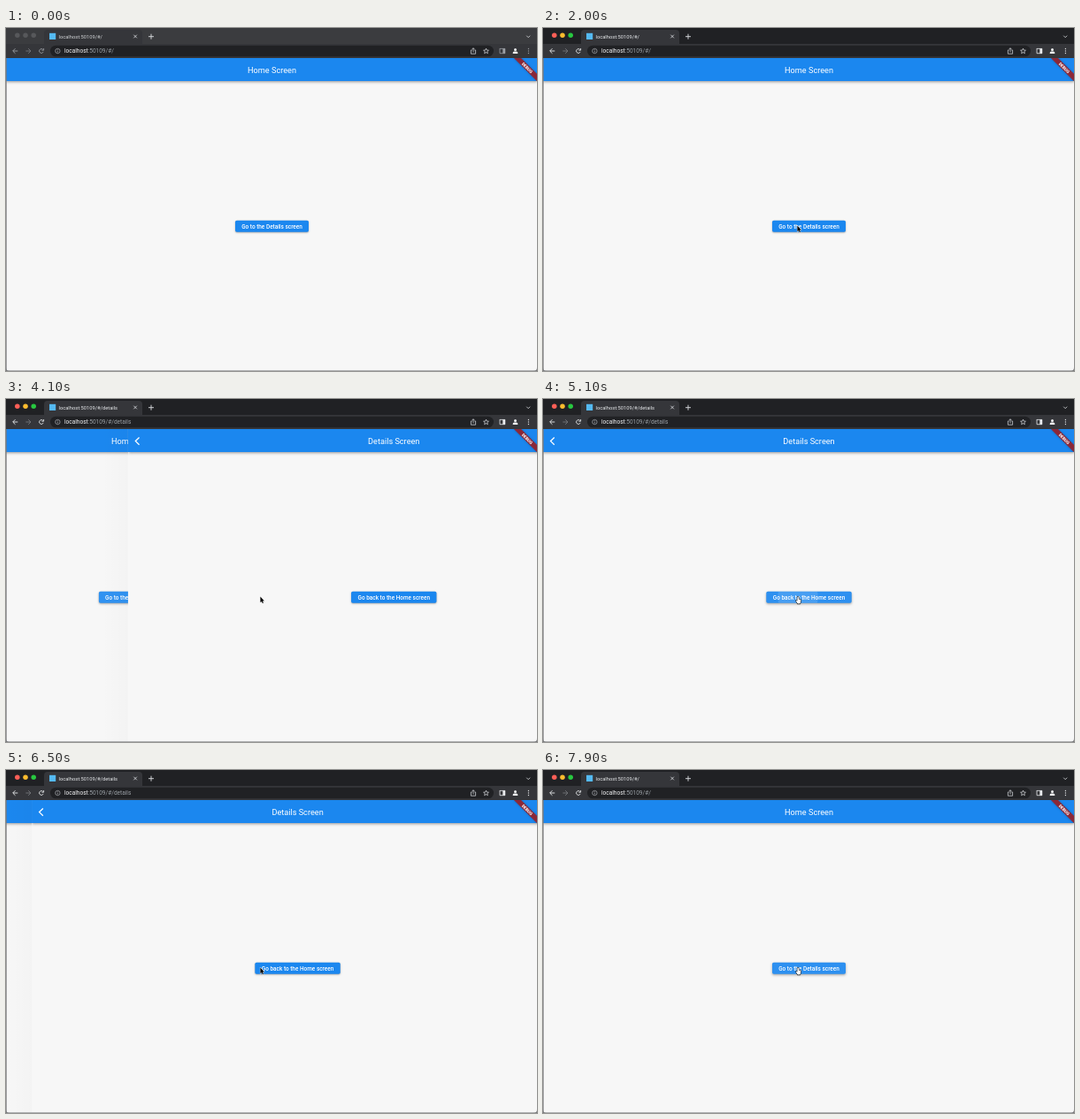
Animation, 600 px wide and 388 px high, one loop 8 s. Source, as an HTML page with a canvas:

```html
<!DOCTYPE html>
<html lang="en">
<head>
<meta charset="utf-8">
<title>Navigation demo</title>
<style>
html, body { margin: 0; width: 100%; height: 100%; overflow: hidden; background: #202124; }
canvas { display: block; width: 600px; height: 388px; }
</style>
</head>
<body>
<canvas id="stage"></canvas>
<script>
const W = 600, H = 388, LOOP = 8000, STEP = 100, SLIDE = 400;
const BLUE = '#1b87ef', PAPER = '#f7f7f7', FONT = 'Roboto, Arial, sans-serif';
const TOP = 34, BAR = 26, MID = 300.5;

const canvas = document.getElementById('stage');
const ctx = canvas.getContext('2d');
const dpr = window.devicePixelRatio || 1;
canvas.width = W * dpr;
canvas.height = H * dpr;

// Each navigation: button press, start of the slide, direction
const MOVES = [
  { press: 3800, start: 3967, open: true },
  { press: 4900, start: 5267, open: false },
  { press: 5900, start: 6267, open: true },
  { press: 7300, start: 7467, open: false }
];
const HOME = { title: 'Home Screen', label: 'Go to the Details screen', half: 41.5, back: false };
const DETAILS = { title: 'Details Screen', label: 'Go back to the Home screen', half: 48.2, back: true };

const clamp = v => Math.max(0, Math.min(1, v));

function bezier(x1, y1, x2, y2) {
  const at = (a, b, u) => 3 * (1 - u) * (1 - u) * u * a + 3 * (1 - u) * u * u * b + u * u * u;
  return x => {
    if (x <= 0 || x >= 1) return clamp(x);
    let lo = 0, hi = 1;
    for (let i = 0; i < 24; i++) {
      const m = (lo + hi) / 2;
      if (at(x1, x2, m) < x) lo = m; else hi = m;
    }
    return at(y1, y2, lo);
  };
}
const linearToEaseOut = bezier(0.35, 0.91, 0.33, 0.97);

function rect(x, y, w, h, color, r = 0) {
  ctx.fillStyle = color;
  ctx.beginPath();
  ctx.roundRect(x, y, w, h, r);
  ctx.fill();
}

function disc(x, y, r, color) {
  ctx.fillStyle = color;
  ctx.beginPath();
  ctx.arc(x, y, r, 0, Math.PI * 2);
  ctx.fill();
}

function ring(x, y, r, color, width, from = 0, to = Math.PI * 2) {
  ctx.strokeStyle = color;
  ctx.lineWidth = width;
  ctx.beginPath();
  ctx.arc(x, y, r, from, to);
  ctx.stroke();
}

function line(color, width, ...pts) {
  ctx.strokeStyle = color;
  ctx.lineWidth = width;
  ctx.beginPath();
  pts.forEach(([x, y], i) => i ? ctx.lineTo(x, y) : ctx.moveTo(x, y));
  ctx.stroke();
}

function text(str, x, y, size, color, weight = 400, align = 'left') {
  ctx.font = `${weight} ${size}px ${FONT}`;
  ctx.textAlign = align;
  ctx.textBaseline = 'alphabetic';
  ctx.fillStyle = color;
  ctx.fillText(str, x, y);
  return ctx.measureText(str).width;
}

function shadow(color, blur, dy, draw) {
  ctx.save();
  ctx.shadowColor = color;
  ctx.shadowBlur = blur * dpr;
  ctx.shadowOffsetY = dy * dpr;
  draw();
  ctx.restore();
}

function star(x, y, r) {
  const pts = [];
  for (let i = 0; i <= 10; i++) {
    const a = -Math.PI / 2 + i * Math.PI / 5, d = i % 2 ? r * 0.45 : r;
    pts.push([x + d * Math.cos(a), y + d * Math.sin(a)]);
  }
  line('#dfe1e5', 0.7, ...pts);
}

function arrowIcon(x, y, dir, color) {
  line(color, 0.9, [x - 2.8 * dir, y], [x + 2.6 * dir, y]);
  line(color, 0.9, [x, y - 2.8], [x + 2.8 * dir, y], [x, y + 2.8]);
}

function drawBrowser(active, path) {
  const tool = '#35363a', icon = active ? '#e8eaed' : '#9a9da2', light = '#dfe1e5';
  rect(0, 0, W, 20, active ? '#202124' : '#3b3c3f');

  // Tab
  rect(43, 2, 111, 18, tool, [4, 4, 0, 0]);
  ['#ff5f57', '#febc2e', '#28c840'].forEach((c, i) =>
    disc(12.8 + i * 9.2, 8.2, 2.75, active ? c : '#57585b'));
  rect(49, 5.8, 7.2, 7.2, '#54b9f2');
  text('localhost:50109' + path, 59.5, 11.7, 5.77, active ? '#e8eaed' : '#d0d2d5');
  line(light, 0.8, [144.3, 7.7], [147.9, 11.3]);
  line(light, 0.8, [147.9, 7.7], [144.3, 11.3]);
  line(light, 0.9, [161, 9.7], [167, 9.7]);
  line(light, 0.9, [164, 6.7], [164, 12.7]);
  line(light, 0.8, [588.2, 8.7], [590.2, 10.7], [592.2, 8.7]);

  // Toolbar
  rect(0, 18, W, TOP - 18, tool);
  rect(50, 19.7, 501, 12.6, '#202124', 6.3);
  arrowIcon(10.5, 26, -1, icon);
  arrowIcon(25.2, 26, 1, '#75777b');
  ring(40, 26, 2.4, icon, 0.85, 0.4, 5.6);
  line(icon, 0.85, [42.6, 23], [42.6, 25.2], [40.4, 25.2]);
  ring(58.4, 26, 2.7, '#b4b7bb', 0.65);
  line('#b4b7bb', 0.7, [58.4, 25.6], [58.4, 27.5]);
  line('#b4b7bb', 0.7, [58.4, 24.3], [58.4, 25]);
  const w = text('localhost', 66, 28.3, 6.53, '#f1f2f4');
  text(':50109' + path, 66 + w, 28.3, 6.53, '#9aa0a6');

  // Right-hand icons
  line(light, 0.7, [526.6, 25], [525.4, 25], [525.4, 29.2], [530.6, 29.2], [530.6, 25], [529.4, 25]);
  line(light, 0.7, [528, 27.4], [528, 22.8]);
  line(light, 0.7, [526.5, 24.2], [528, 22.7], [529.5, 24.2]);
  star(542.5, 26.2, 3.1);
  line(icon, 0.8, [558, 23.4], [563.8, 23.4], [563.8, 28.7], [558, 28.7], [558, 23]);
  rect(561.3, 23.2, 2.7, 5.6, icon);
  disc(575.5, 24.5, 1.5, '#f1f3f4');
  rect(572.7, 26.5, 5.6, 2.4, '#f1f3f4', [1.6, 1.6, 0.2, 0.2]);
  [23.5, 26, 28.5].forEach(y => disc(590.4, y, 0.65, icon));
}

function drawButton(page, press) {
  const { half } = page, x = MID - half, y = 217.8, w = half * 2, h = 13;
  shadow('rgba(0,0,0,0.35)', 2 + press.hover, 0.8 + press.hover * 0.4, () => rect(x, y, w, h, BLUE, 1.8));
  if (press.hover > 0) rect(x, y, w, h, `rgba(255,255,255,${0.08 * press.hover})`, 1.8);
  if (press.ripple > 0) {
    ctx.save();
    ctx.beginPath();
    ctx.roundRect(x, y, w, h, 1.8);
    ctx.clip();
    disc(288, 224, press.radius, `rgba(255,255,255,${0.12 * press.ripple})`);
    ctx.restore();
  }
  text(page.label, MID, 226.6, 6.45, '#fff', 500, 'center');
}

function drawPage(page, dx, press) {
  ctx.save();
  ctx.translate(dx, 0);
  rect(0, TOP, W, H - TOP, PAPER);
  shadow('rgba(0,0,0,0.4)', 3, 1, () => rect(0, TOP, W, BAR, BLUE));
  text(page.title, MID, 51, 9.17, '#fff', 400, 'center');
  if (page.back) line('#fff', 1.3, [12.8, 43.5], [8.6, 47.6], [12.8, 51.7]);
  drawButton(page, press);
  ctx.restore();
}

function drawBanner() {
  ctx.save();
  ctx.translate(W, TOP);
  ctx.rotate(Math.PI / 4);
  shadow('rgba(0,0,0,0.5)', 2.5, 0, () => rect(-18.3, 12.8, 36.6, 5.6, 'rgba(183,28,28,0.63)'));
  rect(-18.3, 12.8, 36.6, 5.6, 'rgba(150,32,40,0.6)');
  text('DEBUG', 0, 17.3, 4.7, '#fff', 900, 'center');
  ctx.restore();
}

function polygon(pts, fill, stroke, width) {
  ctx.beginPath();
  pts.forEach(([x, y], i) => i ? ctx.lineTo(x, y) : ctx.moveTo(x, y));
  ctx.closePath();
  ctx.lineJoin = 'round';
  ctx.strokeStyle = stroke;
  ctx.lineWidth = width;
  ctx.stroke();
  ctx.fillStyle = fill;
  ctx.fill();
  ctx.lineJoin = 'miter';
}

function drawCursor(t, hand) {
  if (t < 400) return;
  const k = Math.pow(1 - clamp((t - 400) / 200), 1.6);
  ctx.save();
  ctx.translate(287.4 + 18.5 * k, 223.6 + 47 * k);
  if (hand) {
    polygon([[0, 0.6], [0.7, 0], [1.4, 0.6], [1.5, 2.8], [3.5, 3.2], [4, 4], [3.7, 6.2], [3, 8],
      [0.4, 8], [-0.7, 6.2], [-1.7, 4.7], [-1.1, 4.1], [0, 4.8]], '#fff', '#111', 1.1);
  } else {
    polygon([[0, 0], [0, 6.7], [1.5, 5.3], [2.5, 7.6], [3.5, 7.1], [2.5, 5], [4.5, 4.8]],
      '#000', 'rgba(255,255,255,0.9)', 1);
  }
  ctx.restore();
}

function stateAt(t) {
  const last = MOVES.filter(m => t >= m.start).pop();
  const next = MOVES.find(m => t < m.start);
  let open = 0, sliding = false;
  if (last) {
    const k = (t - last.start) / SLIDE, e = linearToEaseOut(k);
    open = last.open ? e : 1 - e;
    sliding = k < 1;
  }
  const hovering = !sliding && t >= MOVES[0].press;
  const current = sliding ? last : next;
  const press = { hover: hovering ? 1 : 0, ripple: 0, radius: 0 };
  if (current && t >= current.press) {
    press.radius = 10 + 45 * clamp((t - current.press) / 700);
    press.ripple = sliding ? 1 - clamp((t - current.start) / 250) : 1;
    if (sliding) press.hover = press.ripple;
  }
  return { open, sliding, hovering, press, details: !!last && last.open, fromDetails: sliding && !last.open };
}

function render(t) {
  const s = stateAt(t), idle = { hover: 0, ripple: 0, radius: 0 };
  ctx.setTransform(dpr, 0, 0, dpr, 0, 0);
  rect(0, 0, W, H, '#202124');

  ctx.save();
  ctx.beginPath();
  ctx.rect(0, TOP, W, H - TOP);
  ctx.clip();
  const onDetails = s.sliding ? s.fromDetails : s.details;
  if (s.open < 1) drawPage(HOME, -s.open * W / 3, onDetails ? idle : s.press);
  if (s.open > 0) {
    const x = (1 - s.open) * W;
    if (s.sliding) {
      const g = ctx.createLinearGradient(x - 30, 0, x, 0);
      g.addColorStop(0, 'rgba(0,0,0,0)');
      g.addColorStop(1, 'rgba(0,0,0,0.016)');
      rect(x - 30, TOP, 30, H - TOP, g);
    }
    ctx.save();
    ctx.beginPath();
    ctx.rect(x, TOP, W, H);
    ctx.clip();
    drawPage(DETAILS, x, onDetails ? s.press : idle);
    ctx.restore();
  }
  drawBanner();
  ctx.restore();

  drawBrowser(t >= 1700, s.details ? '/#/details' : '/#/');

  // Window edge with rounded lower corners
  rect(0, TOP, 0.7, H - TOP, '#77787a');
  rect(0, H - 0.7, W, 0.7, '#9a9b9d');
  ctx.fillStyle = '#77787a';
  for (const side of [0, W]) {
    const d = side ? -4 : 4;
    ctx.beginPath();
    ctx.moveTo(side, H);
    ctx.lineTo(side, H - 4);
    ctx.quadraticCurveTo(side, H, side + d, H);
    ctx.fill();
  }
  drawCursor(t, s.hovering);
}

let origin = null;
function tick(now) {
  if (origin === null) origin = now;
  render(Math.floor(((now - origin) % LOOP) / STEP) * STEP);
  requestAnimationFrame(tick);
}
render(0);
requestAnimationFrame(tick);
</script>
</body>
</html>
```
